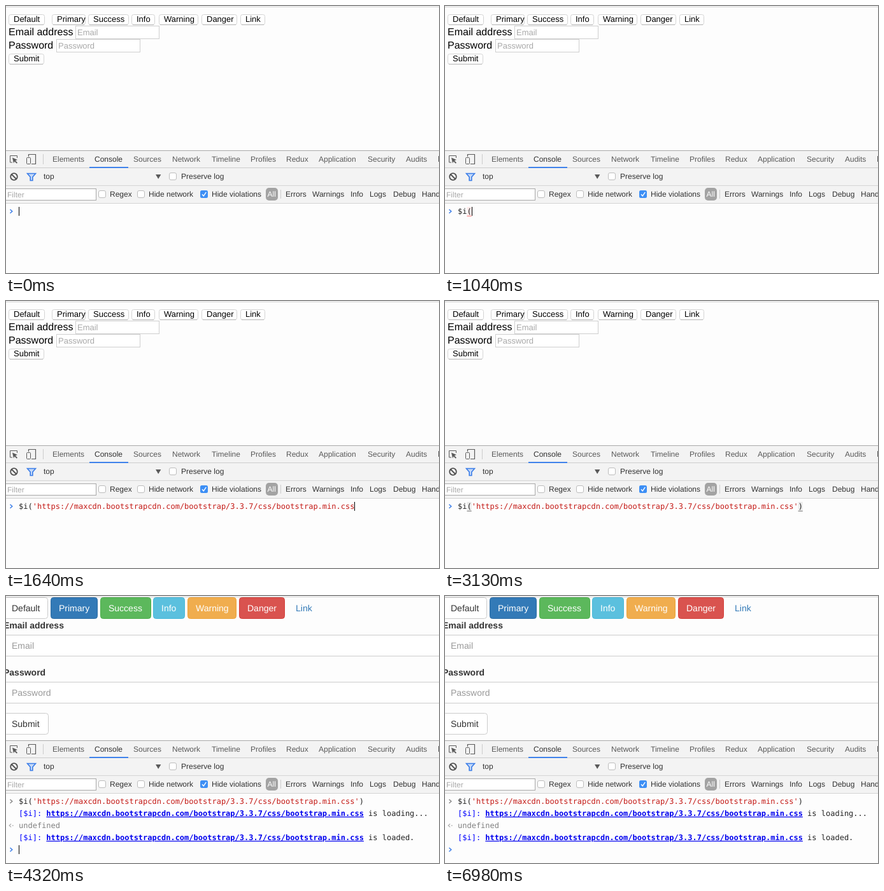
These frames come from a looping animation (680 by 420 pixels, 7080 ms). An HTML page:

```html
<!DOCTYPE html>
<html>
<head>
<meta charset="utf-8">
<style>
html, body { margin: 0; width: 100%; height: 100%; overflow: hidden; background: #fdfdfd; }
svg { display: block; }
text { white-space: pre; text-rendering: geometricPrecision; font: 12px "Liberation Sans", Arial, sans-serif; fill: #333; }
.plain { font-size: 13px; fill: #000; }
.label { font-size: 16px; fill: #000; }
.hint { fill: #a9a9a9; }
.boot { font-size: 14px; }
.bold { font-weight: bold; }
.tab { fill: #5a5a5a; }
.mono { font-family: "DejaVu Sans Mono", monospace; fill: #222; }
.str { fill: #c41a16; }
.blue { fill: #00f; }
.link { fill: #00e; font-weight: bold; text-decoration: underline; }
.grey { fill: #808080; }
.white { fill: #fff; }
.popup { filter: drop-shadow(0 1px 1.5px rgba(0, 0, 0, .25)); }
</style>
</head>
<body>
<svg id="stage" width="680" height="420" viewBox="0 0 680 420"></svg>
<script>
const LOOP = 7080, CHAR = 7.224, LEFT = 20;
const URL_TEXT = 'https://maxcdn.bootstrapcdn.com/bootstrap/3.3.7/css/bootstrap.min.css';
const COMMAND = `$i('${URL_TEXT}')`;
const HISTORY = [COMMAND, COMMAND.replace('3.3.7', '3.3.6'), "$i('https://code.jquery.com/jquery.min.js')"];

const text = (x, y, s, cls = '') => `<text x="${x}" y="${y}" class="${cls}">${s}</text>`;
const span = (s, cls) => `<tspan class="${cls}">${s}</tspan>`;
const rect = (x, y, w, h, fill, more = '') => `<rect x="${x}" y="${y}" width="${w}" height="${h}" fill="${fill}" ${more}/>`;
const box = (x, y, w, h, fill, stroke, r = 0) => rect(x + .5, y + .5, w - 1, h - 1, fill, `stroke="${stroke}" rx="${r}"`);
const path = (d, stroke, width = 1, fill = 'none') => `<path d="${d}" stroke="${stroke}" stroke-width="${width}" fill="${fill}"/>`;
const row = (items, y, cls) => items.map(([s, x]) => text(x, y, s, cls)).join('');
const baseline = line => 327 + line * 19;

// Web page above the tools
function plainPage() {
  const button = (s, x, w, y) =>
    box(x, y, w, 17, '#fff', '#d4d4d4', 3) + rect(x + 2, y + 16, w - 4, 1, '#b4b4b4') + text(x + 8, y + 12, s, 'plain');
  const field = (label, hint, x, y) =>
    text(4, y + 15, label, 'label') + box(x, y, 132, 21, '#fff', '#cfcfcf') + text(x + 3, y + 15, hint, 'plain hint');
  return [['Default', 4, 57], ['Primary', 72, 53], ['Success', 129, 64], ['Info', 197, 37],
    ['Warning', 240, 62], ['Danger', 307, 56], ['Link', 368, 39]].map(b => button(...b, 13)).join('')
    + field('Email address', 'Email', 109, 31) + field('Password', 'Password', 79, 52) + button('Submit', 4, 56, 75);
}

function styledPage(border) {
  const button = (s, x, w, y, fill, stroke, cls) =>
    box(x, y, w, 34, fill, stroke, 4) + text(x + 13, y + 22, s, 'boot ' + cls);
  const field = (s, hint, y) =>
    text(-4, y - 10, s, 'boot bold') + box(-4, y, 690, 34, '#fff', border, 4)
    + `<text x="9" y="${y + 22}" class="boot" style="fill:#999">${hint}</text>`;
  return button('Default', -4, 70, 2, '#fff', '#ccc', '')
    + [['Primary', 70, 74, '#337ab7', '#2e6da4'], ['Success', 148, 80, '#5cb85c', '#4cae4c'],
      ['Info', 231, 50, '#5bc0de', '#46b8da'], ['Warning', 285, 77, '#f0ad4e', '#eea236'],
      ['Danger', 366, 72, '#d9534f', '#d43f3a']].map(([s, x, w, fill, stroke]) => button(s, x, w, 2, fill, stroke, 'white')).join('')
    + `<text x="455" y="24" class="boot" style="fill:#337ab7">Link</text>`
    + field('Email address', 'Email', 61) + field('Password', 'Password', 135)
    + button('Submit', -4, 71, 184, '#fff', '#ccc', '');
}

function toolbars() {
  const line = (y, c) => rect(0, y, 680, 1, c);
  const check = (x, y) => box(x, y, 12, 12, '#fff', '#bdbdbd', 2.5);
  const ink = '#5a5a5a', accent = '#3b7de8';
  return rect(0, 228, 680, 83, '#f3f3f3') + line(227, '#a8a8a8') + line(254, '#ccc') + line(282, '#d4d4d4') + line(310, '#d4d4d4')
    + path('M10 246H6.5V235.5H17.5V239', ink) + path('M10 238.5l8 3.5-3.2 1.2 3.2 3.3-1.3 1.3-3.3-3.3-1.4 3z', 'none', 0, ink)
    + path('M35.5 237V233.5H46.5V248.5H40', ink, 1.2) + box(32, 238, 7, 11, '#f3f3f3', ink, 1)
    + rect(58, 233, 1, 16, '#ccc') + rect(131, 253, 61, 2, '#3f82ea')
    + row([['Elements', 73], ['Sources', 200], ['Network', 261], ['Timeline', 323], ['Profiles', 384], ['Redux', 440],
      ['Application', 491], ['Security', 568], ['Audits', 628]], 245, 'tab')
    + text(139, 245, 'Console') + rect(679, 236, 1, 9, ink)
    + '<circle cx="12.5" cy="268.5" r="5.3" fill="none" stroke="#505050" stroke-width="1.8"/>' + path('M9 265l7 7', '#505050', 1.8)
    + path('M33.5 263.5H46.5L41.8 269V274.5H38.2V269z', accent, 1.6, '#c5d9f8')
    + text(59, 272, 'top') + path('M235 265h8.4l-4.2 7z', 'none', 0, ink)
    + check(256, 262) + text(275, 272, 'Preserve log')
    + box(-1, 287, 143, 19, '#fff', '#a9a9a9') + text(2, 301, 'Filter', 'hint')
    + check(145, 290) + check(206, 290) + rect(305, 290, 12, 12, '#3d8ff5', 'rx="2.5"') + path('M308 296.3l2.3 2.5 4-6', '#fff', 1.4)
    + rect(408, 286, 19, 20, '#a3a3a3', 'rx="5"') + text(410.5, 300, 'All', 'white') + rect(431, 289, 1, 14, '#ccc')
    + row([['Regex', 163], ['Hide network', 224], ['Hide violations', 323], ['Errors', 439], ['Warnings', 481],
      ['Info', 541], ['Logs', 571], ['Debug', 608], ['Handled', 653]], 300);
}

// Console
const chevron = (x, y, color) => path(`M${x} ${y - 3}l3.3 3-3.3 3`, color, 1.5);
const prompt = (line, active) => chevron(6.5, baseline(line) - 4, active ? '#3b7de8' : '#8a8a8a');
const cursor = (chars, line) => rect(Math.round(LEFT + chars * CHAR), baseline(line) - 11, 1, 14, '#000');

function code(s, ghost = '') {
  const end = s.endsWith(')') ? -1 : s.length;
  return text(LEFT, baseline(0), s.slice(0, 3) + span(s.slice(3, end), 'str') + s.slice(3).slice(end === -1 ? -1 : s.length)
    + span(ghost, 'grey'), 'mono');
}

function bracket(index, rgb) {
  const x = LEFT + index * CHAR;
  return rect(x, 316, CHAR, 14, `rgba(${rgb},.07)`) + rect(x, 330, CHAR, 1, `rgba(${rgb},.5)`);
}

function popup(x, right, words, history, prefix) {
  const rows = [...words, ...history];
  const height = words.length > 1 ? 120 : rows.length * 18;
  return `<g class="popup">${rect(x, 330, right - x, height, '#fff', 'stroke="#bbb" stroke-width=".8"')}</g>`
    + rect(x, 330, right - x, 18, '#3875d7')
    + rows.map((s, i) => {
      const past = i >= words.length, y = 343 + i * 18, left = x + (past ? 16 : 3);
      const room = Math.round((right - left) / CHAR);
      const shown = s.length > room ? s.slice(0, room - 1) + '…' : s;
      return (past ? chevron(x + 5.5, y - 4, i ? '#3b7de8' : '#fff') : '')
        + text(left, y, span(shown.slice(0, prefix), 'bold' + (i ? '' : ' white')) + shown.slice(prefix), 'mono' + (i ? '' : ' white'));
    }).join('');
}

function logs() {
  const message = (line, s) =>
    text(LEFT, baseline(line), span('[$i]:', 'blue') + ' ' + span(URL_TEXT, 'link') + s, 'mono');
  const y = baseline(2) - 4;
  return message(1, ' is loading...') + text(LEFT, baseline(2), 'undefined', 'mono grey') + message(3, ' is loaded.')
    + path(`M8 ${y - 2.6}l-2.8 2.6 2.8 2.6`, '#aaa', 1.2) + rect(10, y - .6, 1.5, 1.5, '#aaa');
}

const typing = s => prompt(0, true) + s;
const sent = () => prompt(0, false) + code(COMMAND);
const done = on => styledPage('#ccc') + sent() + logs() + prompt(4, true) + (on ? cursor(0, 4) : '');
const before = s => plainPage() + typing(s);

const scenes = [
  [0, () => before(cursor(0, 0))],
  [290, () => before('')],
  [590, () => before(code('$') + cursor(1, 0) + popup(17, 320, ['$', '$$', '$i', '$x'], HISTORY.slice(0, 1), 1))],
  [890, () => before(code('$i') + cursor(2, 0) + popup(17, 320, ['$i'], HISTORY, 2))],
  [1040, () => before(bracket(2, '255,0,0') + code('$i(') + cursor(3, 0))],
  [1340, () => before(code("$i('", COMMAND.slice(4)) + cursor(4, 0) + popup(38, 559, [], HISTORY.map(s => s.slice(3)), 1))],
  [1640, () => before(code(COMMAND.slice(0, -2)) + cursor(COMMAND.length - 2, 0))],
  [2230, () => before(code(COMMAND))],
  [2530, () => before(matched() + cursor(COMMAND.length, 0))],
  [3130, () => before(matched())],
  [3280, () => styledPage('#e6e6e6') + sent() + prompt(1, true) + cursor(0, 1)],
  ...[3420, 3870, 4320, 4920, 5360, 5960, 6410, 6980].map((time, i) => [time, () => done(i % 2 === 0)])
];

function matched() {
  return bracket(2, '0,0,0') + bracket(COMMAND.length - 1, '0,0,0') + code(COMMAND);
}

const stage = document.getElementById('stage');
const frame = rect(0, 0, 680, 420, '#fdfdfd') + rect(0, 1, 680, 1, '#d2d2d2') + toolbars();
let current;

function draw() {
  const t = performance.now() % LOOP;
  const scene = scenes.findLast(([time]) => time <= t);
  if (scene !== current) {
    current = scene;
    stage.innerHTML = frame + scene[1]();
  }
  requestAnimationFrame(draw);
}
draw();
</script>
</body>
</html>
```
